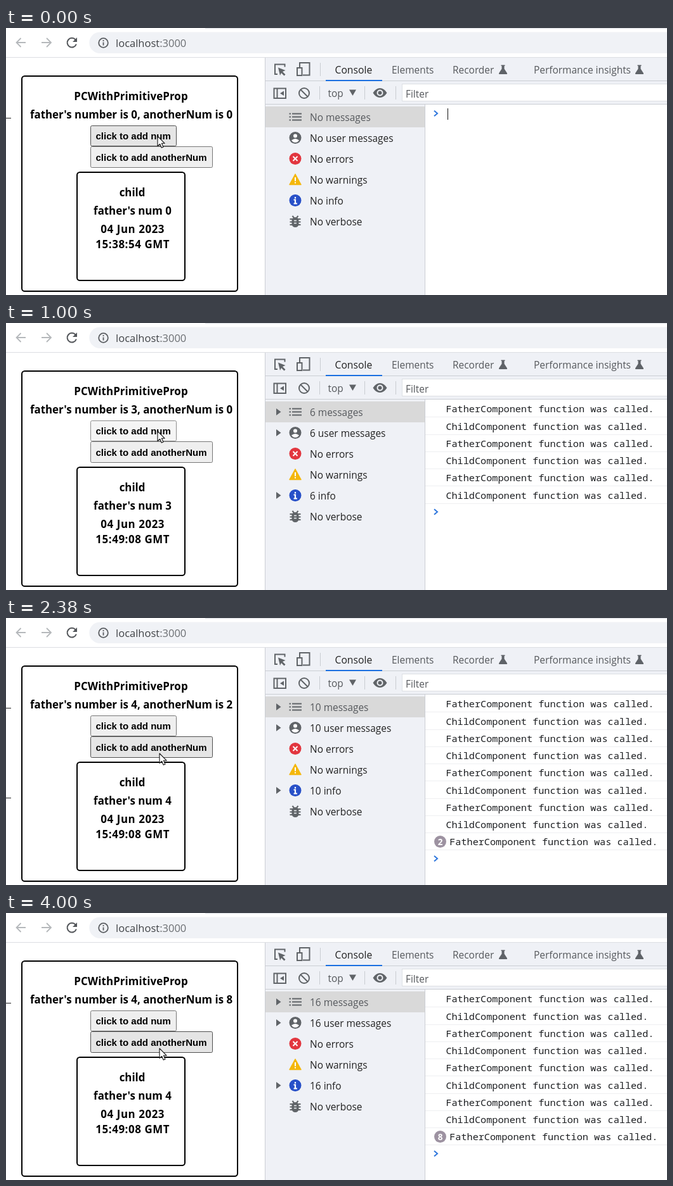
An HTML page that plays this animation: 1042x422 px, repeating every 4.12 s.

```html
<!DOCTYPE html>
<html lang="en">
<head>
<meta charset="utf-8">
<title>Primitive prop demo</title>
<style>
html, body { margin: 0; width: 100%; height: 100%; overflow: hidden; background: #fff; }
svg { display: block; width: 1042px; height: 422px; }
text { white-space: pre; }
.ui { font: 15.45px "Open Sans", sans-serif; fill: #222; }
.ui .dim { fill: #55585c; }
.page { font: bold 16.85px "Open Sans", sans-serif; text-anchor: middle; }
.page .date { letter-spacing: .6px; }
.btn { font: bold 15px "Liberation Sans", Arial, sans-serif; }
.log { font: 15.2px "Noto Sans Mono", monospace; fill: #1d1f22; }
.line { fill: none; stroke: #606468; stroke-width: 2; }
.sep { stroke: #c9ccd1; }
</style>
</head>
<body>
<svg viewBox="0 0 1042 422" xmlns="http://www.w3.org/2000/svg">
  <defs>
    <path id="flask" d="M-3-7H3V-5.5H2V-1L6.5 6Q7 7.5 5.5 7.5H-5.5Q-7 7.5-6.5 6L-2-1V-5.5H-3Z" fill="#5f6368"/>
    <path id="tri" d="M426 -5.5L433.5 0L426 5.5Z" fill="#606468"/>
  </defs>
  <rect width="1042" height="422" fill="#fff"/>

  <!-- address bar -->
  <path d="M314 .5H1042" stroke="#dcdfe4"/>
  <path d="M1042 6.5H148A16.75 16.75 0 0 0 148 40H1042Z" fill="#f0f2f6"/>
  <path d="M0 46.5H1042" stroke="#dcdee2"/>
  <g fill="none" stroke-width="1.8">
    <path d="M31 23H17M23.5 16L16.5 23L23.5 30M56 23H70.5M64 16L71 23L64 30" stroke="#b5b8bb"/>
    <path d="M109.5 18.5A7.3 7.3 0 1 0 110.8 25.5" stroke="#53565a" stroke-width="2"/>
    <circle cx="153.5" cy="23.5" r="7.3" stroke="#5a5d61"/>
    <path d="M153.5 22.5V27.5M153.5 19V21" stroke="#5a5d61"/>
  </g>
  <path d="M112 15V22H105Z" fill="#53565a"/>
  <text class="ui" x="173" y="29.5" style="font-size:16.5px;fill:#404347">localhost<tspan fill="#6b6e72">:3000</tspan></text>

  <!-- page -->
  <g fill="none" stroke="#000" stroke-width="2">
    <rect x="25" y="76" width="340" height="340" rx="4.5"/>
    <rect x="112" y="228" width="170" height="171" rx="4.5"/>
  </g>
  <path id="dash1" d="M0 142.5H8" stroke="#222"/>
  <path id="dash2" d="M0 284.5H8" stroke="#222"/>
  <g class="page">
    <text x="197" y="113.5" style="letter-spacing:.12px">PCWithPrimitiveProp</text>
    <text id="father" x="197.5" y="142.5"></text>
    <text x="199" y="265.5">child</text>
    <text id="child" x="199.5" y="294.5"></text>
    <text class="date" x="199.7" y="324">04 Jun 2023</text>
    <text class="date" id="clock" x="199.7" y="348"></text>
  </g>
  <g class="btn">
    <rect id="btn1" x="133.5" y="154.5" width="135" height="32" rx="2"/>
    <rect id="btn2" x="133.5" y="187.5" width="192" height="33" rx="2"/>
    <text x="141.5" y="176">click to add num</text>
    <text x="141.5" y="210">click to add anotherNum</text>
  </g>

  <!-- devtools panels -->
  <rect x="409" y="47" width="633" height="375" fill="#eff1f6"/>
  <rect x="661" y="121" width="381" height="301" fill="#fff"/>
  <path d="M408.5 47V422M409 83.5H1042M409 120.5H1042M660.5 121V422" stroke="#cbced4" fill="none"/>
  <rect x="504" y="82" width="89" height="2" fill="#1a6fe0"/>
  <rect x="624.5" y="88.5" width="420" height="27" fill="#fff" stroke="#dde0e4"/>
  <rect x="409" y="124" width="251" height="33" fill="#d9d9d9"/>
  <path class="sep" d="M495.5 55V76M494.5 92V113M565.5 92V113M614.5 92V113"/>

  <g class="ui">
    <text x="518.5" y="71.5" style="font-size:15.7px">Console</text>
    <text class="dim" x="608" y="71.5">Elements</text>
    <text class="dim" x="704" y="71.5">Recorder</text>
    <text class="dim" x="832" y="71.5">Performance insights</text>
    <text class="dim" x="507.5" y="108.5">top</text>
    <text class="dim" x="630" y="109.5">Filter</text>
  </g>
  <use href="#flask" x="783.5" y="65.5"/>
  <use href="#flask" x="998.5" y="65.5"/>
  <path d="M541 97.5H552L546.5 107Z" fill="#606468"/>

  <g class="line">
    <path d="M428 73H424V57.5H439.5V61.5"/>
    <path d="M463 62V55H478.5V74.5H468"/>
    <rect x="459" y="63" width="7.5" height="12"/>
    <rect x="422.5" y="95.5" width="18.5" height="15.5"/>
    <path d="M427.5 95V111"/>
    <circle cx="470" cy="103" r="8"/>
    <path d="M464.5 97.5L475.5 108.5"/>
  </g>
  <path d="M429 62.5L440.5 67L436 69L440.5 73.5L438.5 75.5L434 71L432 75Z" fill="#606468"/>
  <path d="M438 99.5V107L432 103.25Z" fill="#606468"/>
  <path d="M578.5 102.5Q583 95 589.5 95T600.5 102.5Q596 110 589.5 110T578.5 102.5Z" fill="#606468"/>
  <circle cx="589.5" cy="102.5" r="4" fill="#606468" stroke="#eff1f6" stroke-width="2"/>

  <!-- sidebar icons -->
  <path d="M451 135.5H466M451 140.5H466M451 145.5H466M446.5 135.5H449M446.5 140.5H449M446.5 145.5H449" class="line" style="stroke-width:1.8"/>
  <g transform="translate(456 173.5)">
    <circle r="9.5" fill="#606468"/><circle cy="-3" r="3" fill="#fff"/>
    <path d="M-6 4Q0-1 6 4Q3.5 7.5 0 7.5T-6 4Z" fill="#fff"/>
  </g>
  <g transform="translate(456 206.5)">
    <circle r="9.5" fill="#e2363f"/>
    <path d="M-3.5-3.5L3.5 3.5M3.5-3.5L-3.5 3.5" stroke="#fff" stroke-width="2"/>
  </g>
  <g transform="translate(456 239.5)">
    <path d="M0-8.5L9 8H-9Z" fill="#f4b70c" stroke="#f4b70c" stroke-width="1.5" stroke-linejoin="round"/>
    <path d="M0-3.5V2.5M0 4V6" stroke="#fff" stroke-width="2"/>
  </g>
  <g transform="translate(456 272.5)">
    <circle r="9.5" fill="#2850c8"/>
    <path d="M0-5.5V-3M-2.5-1H0V5M-2.5 5H3" stroke="#fff" stroke-width="2.2" fill="none"/>
  </g>
  <g transform="translate(456 306)">
    <path d="M-8.5-4H8.5M-8.5 .5H8.5M-8.5 5H8.5M-4.5-9L-2-6M4.5-9L2-6" stroke="#606468" stroke-width="2"/>
    <rect x="-5.5" y="-7" width="11" height="16" rx="5.5" fill="#606468"/>
    <path d="M-2-1.5H2M-2 2.5H2" stroke="#eff1f6" stroke-width="1.7"/>
  </g>
  <g id="arrows"><use href="#tri" y="140.5"/><use href="#tri" y="173.5"/><use href="#tri" y="272.5"/></g>
  <g class="ui">
    <text class="dim" id="all" x="479" y="146.5"></text>
    <text id="user" x="479" y="179.5"></text>
    <text x="479" y="212.5">No errors</text>
    <text x="479" y="245.5">No warnings</text>
    <text id="info" x="479" y="278.5"></text>
    <text x="479" y="311.5">No verbose</text>
  </g>

  <!-- console -->
  <g id="rows" class="log"></g>
  <g id="badge">
    <circle cx="684.5" cy="353.5" r="9.5" fill="#9d92a1"/>
    <text id="repeat" x="684.5" y="358.5" text-anchor="middle" fill="#fff" style="font:bold 13.5px 'Open Sans',sans-serif"></text>
  </g>
  <path id="prompt" d="M675-4.5L680-.2L675 4.1" fill="none" stroke="#2f77dd" stroke-width="2"/>
  <path id="caret" d="M696.5 127V145" stroke="#111"/>

  <path id="mouse" d="M0 0V15.5L3.6 12.3L6.2 18.3L9 17.1L6.4 11.3H11.2Z" fill="#fff" stroke="#111" stroke-width="1.1" stroke-linejoin="round"/>
</svg>
<script>
const LOOP = 4120, STEP = 125, ROW = 27.25;
const numClicks = [2, 4, 6, 9];
const otherClicks = [17, 19, 21, 23, 24, 26, 29, 31];
const clocks = ["15:38:54", "15:49:06", "15:49:07", "15:49:08", "15:49:08"];

const $ = id => document.getElementById(id);
const say = (id, s) => { if ($(id).textContent !== s) $(id).textContent = s; };
const show = (id, on) => $(id).setAttribute("visibility", on ? "visible" : "hidden");
const count = (list, k) => list.filter(c => c <= k).length;

function add(parent, tag, attrs) {
  const el = document.createElementNS("http://www.w3.org/2000/svg", tag);
  for (const key in attrs) el.setAttribute(key, attrs[key]);
  return parent.appendChild(el);
}

const rows = Array.from({ length: 9 }, (_, i) => {
  const g = add($("rows"), "g", {});
  const text = add(g, "text", { x: 693.4, y: 141.3 + ROW * i });
  text.textContent = (i % 2 ? "Child" : "Father") + "Component function was called.";
  add(g, "path", { d: `M661 ${Math.floor(121.5 + ROW * (i + 1)) + .5}H1042`, stroke: "#eeeff1" });
  return { g, text };
});

function paintButton(id, hover, active) {
  $(id).setAttribute("fill", active ? "#f5f5f5" : hover ? "#e5e5e5" : "#efefef");
  $(id).setAttribute("stroke", active ? "#8d8d8d" : hover ? "#4f4f4f" : "#767676");
}

function draw(t) {
  const k = Math.floor(Math.floor(t / 10) * 10 / STEP);
  const num = count(numClicks, k), other = count(otherClicks, k);
  const total = num * 2 + other;
  const lines = num * 2 + (other ? 1 : 0);
  const label = total || "No";

  say("father", `father's number is ${num}, anotherNum is ${other}`);
  say("child", `father's num ${num}`);
  say("clock", clocks[num] + " GMT");
  say("all", label + " messages");
  say("user", label + " user messages");
  say("info", label + " info");
  say("repeat", String(other));

  rows.forEach((r, i) => r.g.setAttribute("visibility", i < lines ? "visible" : "hidden"));
  rows[8].text.setAttribute("x", other > 1 ? 699.2 : 693.4);
  show("badge", other > 1);
  show("arrows", total);
  show("caret", !total);
  $("prompt").setAttribute("transform", `translate(0 ${135.2 + ROW * lines})`);
  show("dash1", k < 1 || k > 13);
  show("dash2", k > 17 && k < 21);

  // pointer glides from the first button to the second
  const u = Math.min(1, Math.max(0, (k - 10) / 5)), e = u * u * (3 - 2 * u);
  const y = 171 + 43 * e;
  $("mouse").setAttribute("transform", `translate(${239 + 3 * e} ${y})`);
  paintButton("btn1", y < 187, numClicks.includes(k + 1));
  paintButton("btn2", y >= 187, k > 16 && k !== 23 && otherClicks.includes(k + 1));
}

function tick(now) {
  draw(now % LOOP);
  requestAnimationFrame(tick);
}
draw(0);
requestAnimationFrame(tick);
</script>
</body>
</html>
```
